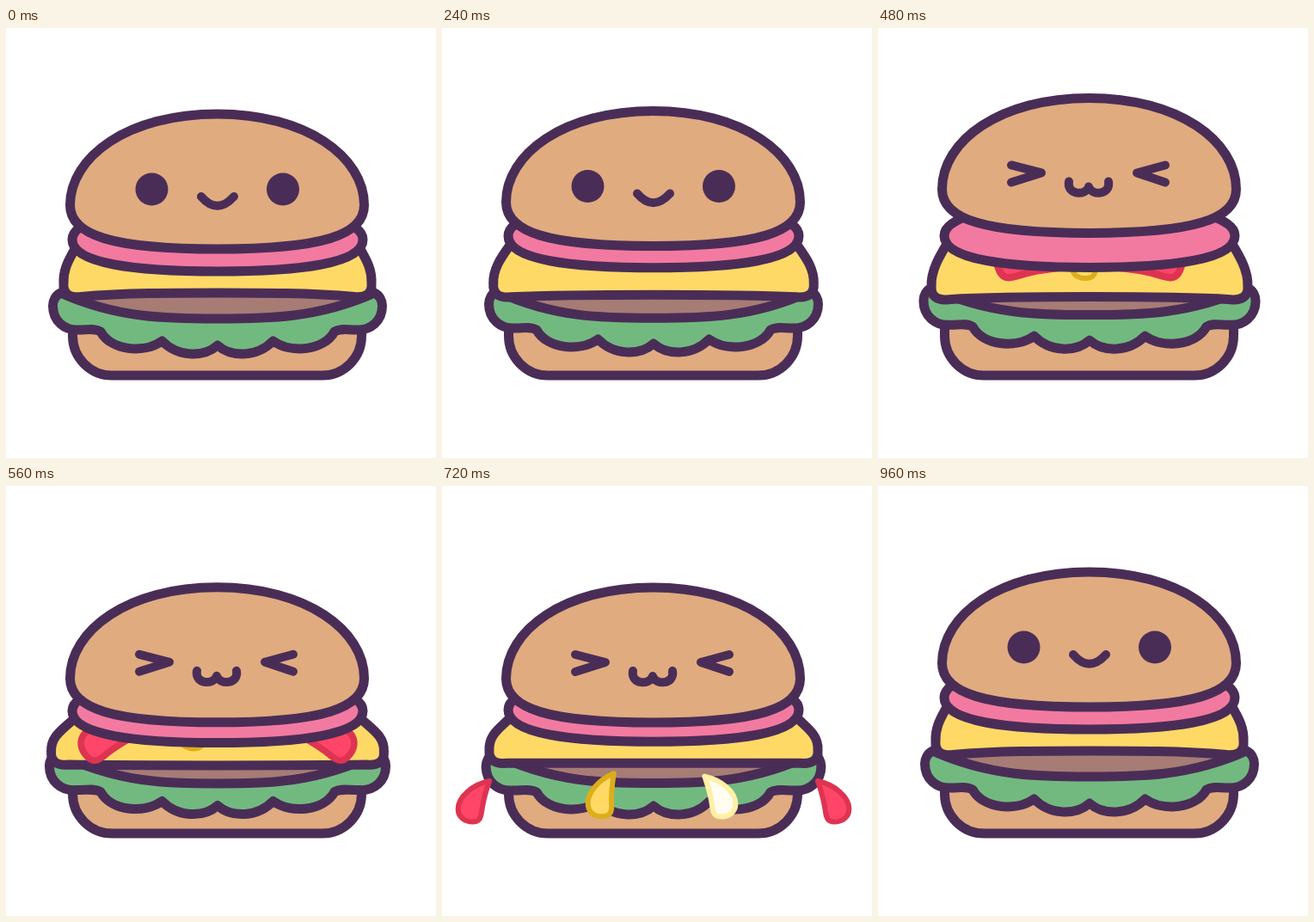
Recreate the animation shown at these times as an HTML page with a canvas. Size 500x500 px, loop 1.04 s.

```html
<!DOCTYPE html>
<html>
<head>
<meta charset="utf-8">
<style>
html, body { margin: 0; width: 100%; height: 100%; overflow: hidden; background: #fff; }
canvas { display: block; }
</style>
</head>
<body>
<canvas id="stage" width="500" height="500"></canvas>
<script>
const ctx = document.getElementById('stage').getContext('2d');
const STEP = 80, STEPS = 13, LAUNCH = 6, LIFE = 4;
const INK = '#4a2d57', BREAD = '#e0ab7f', RED = '#ff4668', DARK_RED = '#dd3452';

// Four poses; every value eases from one to the next
const rest = { bun: 0, ham: 246, cheeseW: 179, corner: 313, belly: 308, leaf: 0, dip: 338, leafW: 191.5 };
const crouch = { bun: 9, ham: 246, cheeseW: 189, corner: 314, belly: 312, leaf: 1, dip: 341, leafW: 191.5 };
const jump = { bun: -41, ham: 229, cheeseW: 178, corner: 311, belly: 305, leaf: -11, dip: 326, leafW: 191.5 };
const land = { bun: 24, ham: 265, cheeseW: 195, corner: 326, belly: 327, leaf: 4, dip: 348, leafW: 196 };
const keys = [[0, rest], [2, crouch], [5, jump], [7.5, land], [12, rest]];

// Sauce flies out from x0 to x1 (measured from the middle) while y = y0 + fall * age ^ power
const outer = { x0: 78, x1: 221, y0: 270, fall: 26, power: 1.22, size: 1.4, shrink: 0.13, turn: 65, spin: -65 / 3, fill: RED, edge: DARK_RED };
const inner = { x0: 5, x1: 65, y0: 270, fall: 14.4, power: 1.7, size: 1, shrink: 0, turn: -10, spin: 0, fill: '#ffd964', edge: '#dcae1b' };
const drops = [
  { ...inner, side: 1 },
  { ...inner, side: -1, x0: 10, x1: 84, y0: 260, fall: 16, turn: 0, fill: '#fffdf0', edge: '#fff0a6' },
  { ...outer, side: 1 },
  { ...outer, side: -1 }
];
const dropShape = new Path2D('M19-26C0-22-17-8-17 6C-17 16-9 21 0 21C7 21 9 17 10 10C12-6 15-14 19-26Z');

function poseAt(n) {
  const k = Math.max(1, keys.findIndex(([time]) => time >= n));
  const [t0, a] = keys[k - 1], [t1, b] = keys[k];
  const ease = (1 - Math.cos(Math.PI * (n - t0) / (t1 - t0))) / 2;
  return Object.fromEntries(Object.keys(a).map(key => [key, a[key] + (b[key] - a[key]) * ease]));
}

// Closed cubic outline from its right half, mirrored about cx
function shape(fill, half, cx, dy = 0) {
  const pts = [];
  for (let i = 0; i < half.length; i += 2) pts.push([half[i], half[i + 1]]);
  const all = pts.concat(pts.slice(0, -1).reverse().map(([x, y]) => [-x, y]))
    .map(([x, y]) => [cx + x, y + dy]);
  ctx.beginPath();
  ctx.moveTo(...all[0]);
  for (let i = 1; i < all.length; i += 3) ctx.bezierCurveTo(...all[i], ...all[i + 1], ...all[i + 2]);
  ctx.closePath();
  ctx.fillStyle = fill;
  ctx.fill();
  ctx.stroke();
}

function drawDrop(d, age) {
  const x = d.x0 + (d.x1 - d.x0) * Math.sin(Math.PI / 2 * age / LIFE);
  const size = d.size - d.shrink * age;
  ctx.save();
  ctx.translate(246 - d.side * x, d.y0 + d.fall * age ** d.power);
  ctx.scale(d.side * size, size);
  ctx.rotate((d.turn + d.spin * age) * Math.PI / 180);
  ctx.fillStyle = d.fill;
  ctx.strokeStyle = d.edge;
  ctx.lineWidth = 6;
  ctx.fill(dropShape);
  ctx.stroke(dropShape);
  ctx.restore();
}

function drawFace(dy, squeezed) {
  ctx.save();
  ctx.translate(0, dy);
  ctx.lineWidth = 10;
  if (squeezed) {
    ctx.stroke(new Path2D('M155 178L190 187L155 198M334 178L301 187L334 198'));
    ctx.stroke(new Path2D('M222 197C219 213 242 214 245 203C248 214 271 213 268 197'));
  } else {
    ctx.fillStyle = INK;
    const ry = 19 - Math.max(0, -dy - 20) / 2;
    for (const x of [169.5, 322]) {
      ctx.beginPath();
      ctx.ellipse(x, 187.5, 19, ry, 0, 0, 2 * Math.PI);
      ctx.fill();
    }
    ctx.stroke(new Path2D('M227 196Q245.5 217.5 265 196'));
  }
  ctx.restore();
}

function draw(n) {
  const { bun, ham, cheeseW: w, corner, belly, leaf, dip, leafW } = poseAt(n);
  const age = n - LAUNCH, flying = age >= 0 && age <= LIFE;
  ctx.clearRect(0, 0, 500, 500);
  ctx.lineJoin = ctx.lineCap = 'round';
  ctx.strokeStyle = INK;
  ctx.lineWidth = 11;

  // bottom bun and patty
  ctx.beginPath();
  ctx.roundRect(77.5, 332, 336, 72, [10, 10, 46, 46]);
  ctx.fillStyle = BREAD;
  ctx.fill();
  ctx.stroke();
  ctx.fillStyle = '#a67c75';
  ctx.fillRect(92, 300, 308, 45);

  // lettuce
  shape('#72b980', [0, dip, 56, dip, 116, dip, leafW - 9, 308 + leaf,
    leafW - 3, 311 + leaf, leafW, 317 + leaf, leafW, 323 + leaf,
    leafW, 341 + leaf, leafW - 14, 352 + leaf, leafW - 30, 351 + leaf,
    150, 351 + leaf, 143, 349 + leaf, 136, 353 + leaf,
    124, 375 + leaf, 86, 379 + leaf, 64.5, 364 + leaf,
    47, 382 + leaf, 17, 384 + leaf, 0, 369 + leaf], 246);

  // cheese
  const top = ham + 5;
  shape('#ffd966', [0, top, 60, top, 120, top, 163, top,
    163 + (w - 163) * 0.4, top + 14, w + 1, corner - 36, w, corner - 16,
    w + 1, corner - 5, w - 6, corner + 1, w - 20, corner - 0.5,
    w * 0.6, belly, w * 0.3, belly, 0, belly], 246);

  if (flying) drops.forEach(d => drawDrop(d, age));

  // ham and top bun
  shape('#f27aa0', [0, -36, 96, -36, 169, -26, 169, 0, 169, 28, 96, 37, 0, 37], 246, ham);
  shape(BREAD, [0, 100, 104, 100, 171, 150, 171, 206, 171, 241, 122, 257, 0, 257], 245.5, bun);
  drawFace(bun, flying);
}

function tick() {
  draw(Math.floor(performance.now() / STEP) % STEPS);
  requestAnimationFrame(tick);
}
tick();
</script>
</body>
</html>
```
